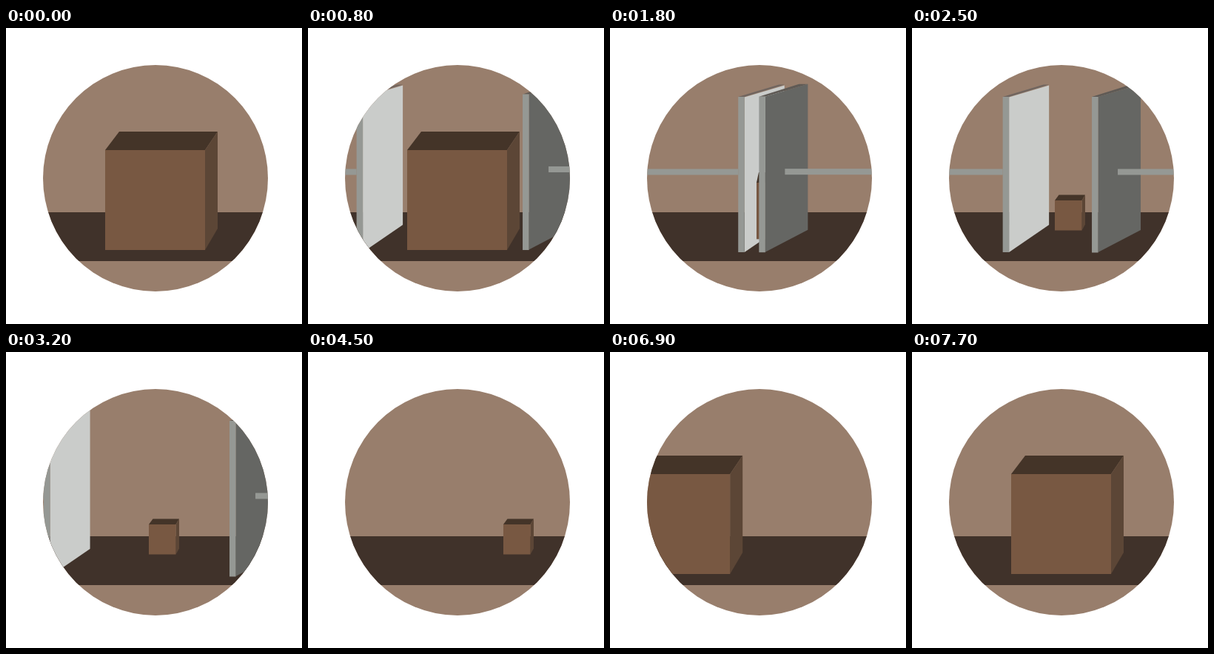
An HTML page with a canvas that plays this animation: 400x400 px, repeating every 7800 ms.

```html
<!DOCTYPE html>
<html lang="en">
<head>
<meta charset="utf-8">
<title>Box press</title>
<style>
  html, body { margin: 0; width: 100%; height: 100%; overflow: hidden; background: #fff; }
  canvas { display: block; }
</style>
</head>
<body>
<canvas id="stage" width="400" height="400"></canvas>
<script>
const ctx = document.getElementById('stage').getContext('2d');
const LOOP = 7800, STEP = 100;
const CLOSED = 1900, OPENED = 3900;

// Box: front x, y, width, height, then depth offsets: left dx, right dx, top dy, bottom dy
const BIG = [134, 165, 135, 135, 19, 17, 25, 29];
const PRESSED = [206, 214.5, 8, 69, 1, 1, 12.6, 14];
const SMALL = [193, 233, 36.5, 40.5, 5.5, 4.5, 7.5, 8];

const mix = (a, b, k) => a + (b - a) * k;
const progress = (t, from, to) => Math.min(1, Math.max(0, (t - from) / (to - from)));

function poly(color, ...pts) {
  ctx.fillStyle = color;
  ctx.beginPath();
  for (let i = 0; i < pts.length; i += 2) ctx.lineTo(pts[i], pts[i + 1]);
  ctx.fill();
}

function rect(color, x, y, w, h) {
  ctx.fillStyle = color;
  ctx.fillRect(x, y, w, h);
}

function drawBox([x, y, w, h, dl, dr, dt, db], shift = 0) {
  x += shift;
  const r = x + w, b = y + h;
  poly('#443428', x, y, x + dl, y - dt, r + dr, y - dt, r, y);
  poly('#5c4636', r, y, r + dr, y - dt, r + dr, b - db, r, b);
  rect('#785842', x, y, w, h);
}

function drawLeftPanel(x) {
  rect('#959894', 0, 190.5, x, 8);
  poly('#70655f', x, 93, x + 55, 76.5, x + 62.5, 76.5, x + 8.5, 93);
  poly('#caccca', x + 8.5, 93.5, x + 62.5, 77.5, x + 62.5, 266, x + 8.5, 303);
  rect('#959894', x, 93, 8.5, 210);
}

function drawRightPanel(x, dy) {
  ctx.save();
  ctx.translate(x, dy);
  poly('#5f5a55', 0, 93, 54, 76, 66, 76, 8.5, 93);
  poly('#656663', 8.5, 93, 66, 76, 66, 273, 8.5, 303);
  rect('#959894', 0, 93, 8.5, 210.5);
  rect('#959894', 35, 190.5, 400, 8);
  ctx.restore();
}

function drawCurrentBox(t) {
  if (t < CLOSED) {
    const k = progress(t, 1000, CLOSED);
    drawBox(BIG.map((v, i) => mix(v, PRESSED[i], k)));
  } else if (t < 5500) {
    drawBox(SMALL, Math.max(0, (t - 3954) * 0.13));
  } else {
    drawBox(BIG, Math.min(0, (t - 7700) * 0.1335));
  }
}

function draw(t) {
  ctx.clearRect(0, 0, 400, 400);
  ctx.save();
  ctx.beginPath();
  ctx.ellipse(202, 203, 152, 153, 0, 0, 2 * Math.PI);
  ctx.clip();
  rect('#987e6c', 0, 0, 400, 400);
  rect('#40322a', 0, 249, 400, 66);

  const closing = t < CLOSED;
  const k = closing ? t / CLOSED : 1 - progress(t, CLOSED, OPENED);
  if (k > 0) drawLeftPanel(mix(-20.5, 184, k));
  drawCurrentBox(t);
  if (k > 0) drawRightPanel(mix(361, 192.5, k), closing ? mix(-6, 0, k) : 0);
  ctx.restore();
}

const start = performance.now();
function tick() {
  const t = (performance.now() - start) % LOOP;
  draw(Math.floor(t / STEP) * STEP);
  requestAnimationFrame(tick);
}
tick();
</script>
</body>
</html>
```
